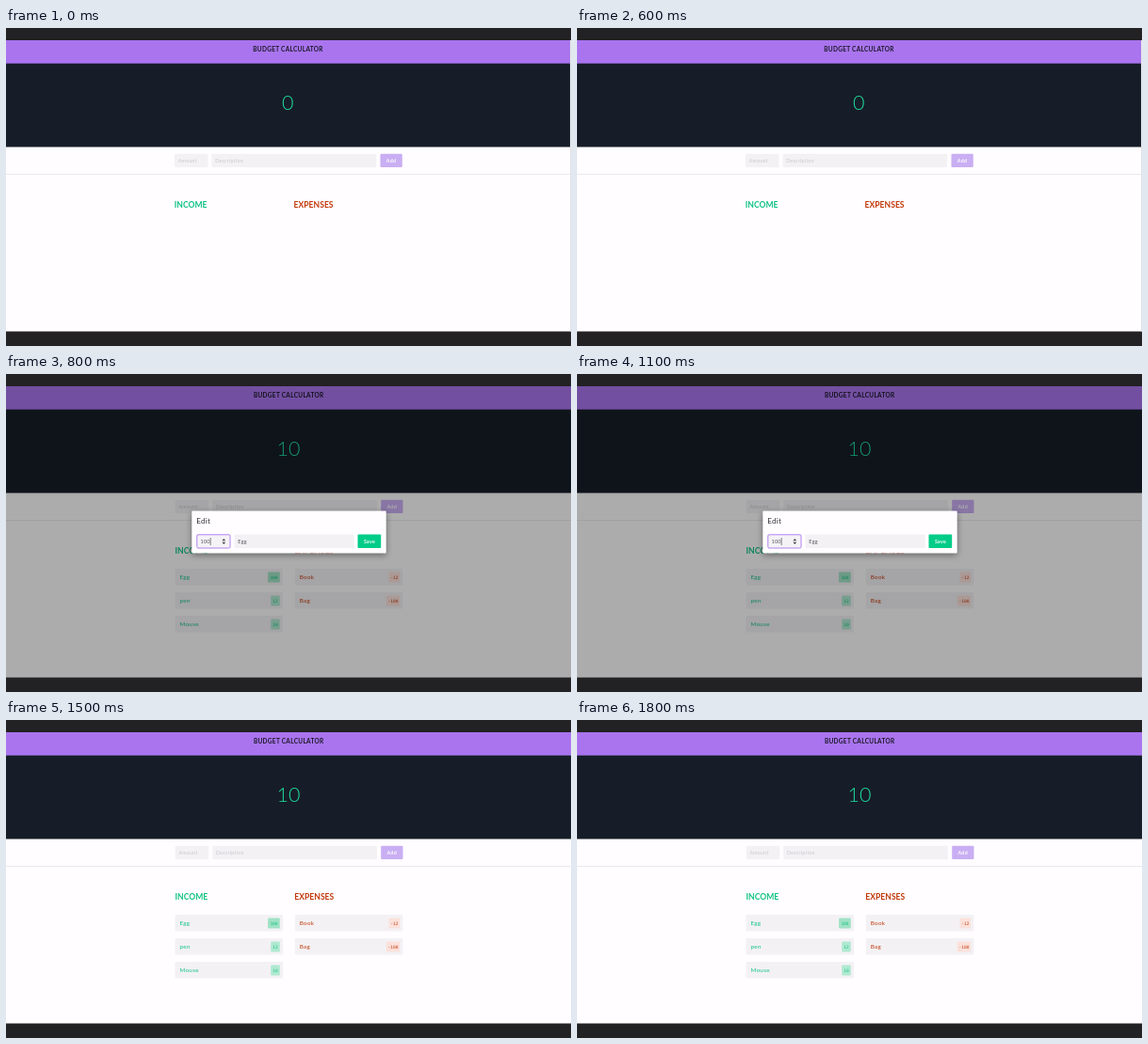
Recreate the animation shown at these times as an HTML page. Size 600 px wide and 338 px high, loop 2000 ms.

```html
<!DOCTYPE html>
<html lang="en">
<head>
<meta charset="utf-8">
<title>Budget calculator</title>
<style>
  html, body { margin: 0; width: 100%; height: 100%; overflow: hidden; background: #222123; }
  svg { display: block; width: 100vw; height: 100vh; }
  text { font-family: Lato, sans-serif; letter-spacing: .3px; white-space: pre; }
  .mono { font-family: "DejaVu Sans Mono", monospace; letter-spacing: 0; }
  .tight { letter-spacing: 0; }
  .modal { filter: drop-shadow(0 2px 3px rgba(0, 0, 0, .4)); }
</style>
</head>
<body>
<svg id="stage" viewBox="0 0 600 338"></svg>
<script>
const LOOP = 2000, MODAL_OPENS = 800, MODAL_CLOSES = 1500;
const GREEN = '#10c283', RED = '#c23a0c', PURPLE = '#a974ee', FIELD = '#f3f1f4', WHITE = '#fffdff';

const rect = (x, y, w, h, fill, extra = '') =>
  `<rect x="${x}" y="${y}" width="${w}" height="${h}" fill="${fill}" ${extra}/>`;
const text = (content, x, y, size, fill, extra = '') =>
  `<text x="${x}" y="${y}" font-size="${size}" fill="${fill}" ${extra}>${content}</text>`;
const group = (id, content, extra = '') => `<g id="${id}" ${extra}>${content}</g>`;

const BOLD = 'font-weight="700"';
const CENTER = 'text-anchor="middle"';
const ROUND = 'rx="1"';

const total = (value, x) =>
  text(value, x, 87.2, 21.5, '#1fdc9c', `${CENTER} font-weight="300" class="tight"`);

function item(name, amount, x, row, color, badgeFill, badgeWidth) {
  const y = 207 + row * 25;
  const badgeX = x + 111.3 - badgeWidth;
  return rect(x, y, 114.5, 17.5, FIELD, ROUND) +
    text(name, x + 5, y + 11, 6.25, color) +
    rect(badgeX, y + 3.5, badgeWidth, 11, badgeFill, ROUND) +
    text(amount, badgeX + badgeWidth / 2, y + 10.6, 4.5, color, `${CENTER} class="mono"`);
}

const background =
  rect(0, 13, 600, 25, PURPLE) +
  rect(0, 37.7, 600, 89, '#161d28') +
  rect(0, 126.5, 600, 196, WHITE) +
  rect(0, 155, 600, 1, '#ece9ee');

const page =
  text('BUDGET CALCULATOR', 262.2, 25, 6.5, '#1c1929', BOLD) +
  rect(179, 133.7, 35.5, 14.3, FIELD, ROUND) +
  text('Amount', 182.8, 142.8, 5.2, '#c9c7cb') +
  rect(218.5, 133.7, 174.7, 14.3, FIELD, ROUND) +
  text('Description', 222.3, 142.8, 5.2, '#c9c7cb') +
  rect(397.5, 133.7, 23.3, 14.3, '#c9aef3', ROUND) +
  text('Add', 409, 142.8, 5.3, WHITE, `${BOLD} ${CENTER}`) +
  text('INCOME', 178.8, 191.2, 8.6, GREEN, `${BOLD} class="tight"`) +
  text('EXPENSES', 305.6, 191.2, 8.6, RED, `${BOLD} class="tight"`);

const emptyState = total('0', 299.3) + rect(599, 13, 1, 309.5, '#e4e2e6');

const filledState = total('10', 300) +
  item('Egg', '100', 179.5, 0, GREEN, '#a0e2c5', 12.7) +
  item('pen', '12', 179.5, 1, GREEN, '#b0e9d1', 9.6) +
  item('Mouse', '10', 179.5, 2, GREEN, '#b0e9d1', 9.6) +
  item('Book', '-12', 306.8, 0, RED, '#fbe1db', 11.6) +
  item('Bag', '-100', 306.8, 1, RED, '#fbe1db', 14.3);

const modal =
  rect(0, 13, 600, 309.7, '#000', 'opacity=".32"') +
  rect(197.3, 145.5, 206.4, 45, WHITE, `${ROUND} class="modal"`) +
  text('Edit', 202.2, 159, 8, '#302e36') +
  rect(202.8, 170.8, 35.2, 14.2, '#f5f3f6', `rx="1.2" stroke="${PURPLE}" stroke-width=".9"`) +
  text('100', 206.4, 179.8, 5.5, '#57545c') +
  rect(216.8, 174, .6, 8, '#333') +
  '<path d="M229.4 177.2l1.9-2.2 1.9 2.2zM229.4 178.8l1.9 2.2 1.9-2.2z" fill="#444"/>' +
  rect(242.5, 170.6, 127.2, 14.4, FIELD, ROUND) +
  text('Egg', 246.3, 179.8, 5.4, '#57545c') +
  rect(373.5, 170.6, 24.7, 14.4, '#00cc88', ROUND) +
  text('Save', 386, 179.7, 5.3, WHITE, `${BOLD} ${CENTER}`);

document.getElementById('stage').innerHTML = background + group('page', page) +
  group('empty', emptyState) + group('filled', filledState) + group('modal', modal);

const [pageEl, emptyEl, filledEl, modalEl] =
  ['page', 'empty', 'filled', 'modal'].map(id => document.getElementById(id));
const show = (el, visible) => el.setAttribute('display', visible ? 'inline' : 'none');

function draw(now) {
  const t = now % LOOP;
  const filled = t >= MODAL_OPENS;
  show(emptyEl, !filled);
  show(filledEl, filled);
  show(modalEl, filled && t < MODAL_CLOSES);
  // Without the scrollbar the centred layout sits slightly further right.
  pageEl.setAttribute('transform', `translate(${filled ? .7 : 0} 0)`);
}

const start = performance.now();
function tick() {
  draw(performance.now() - start);
  requestAnimationFrame(tick);
}
tick();
</script>
</body>
</html>
```
